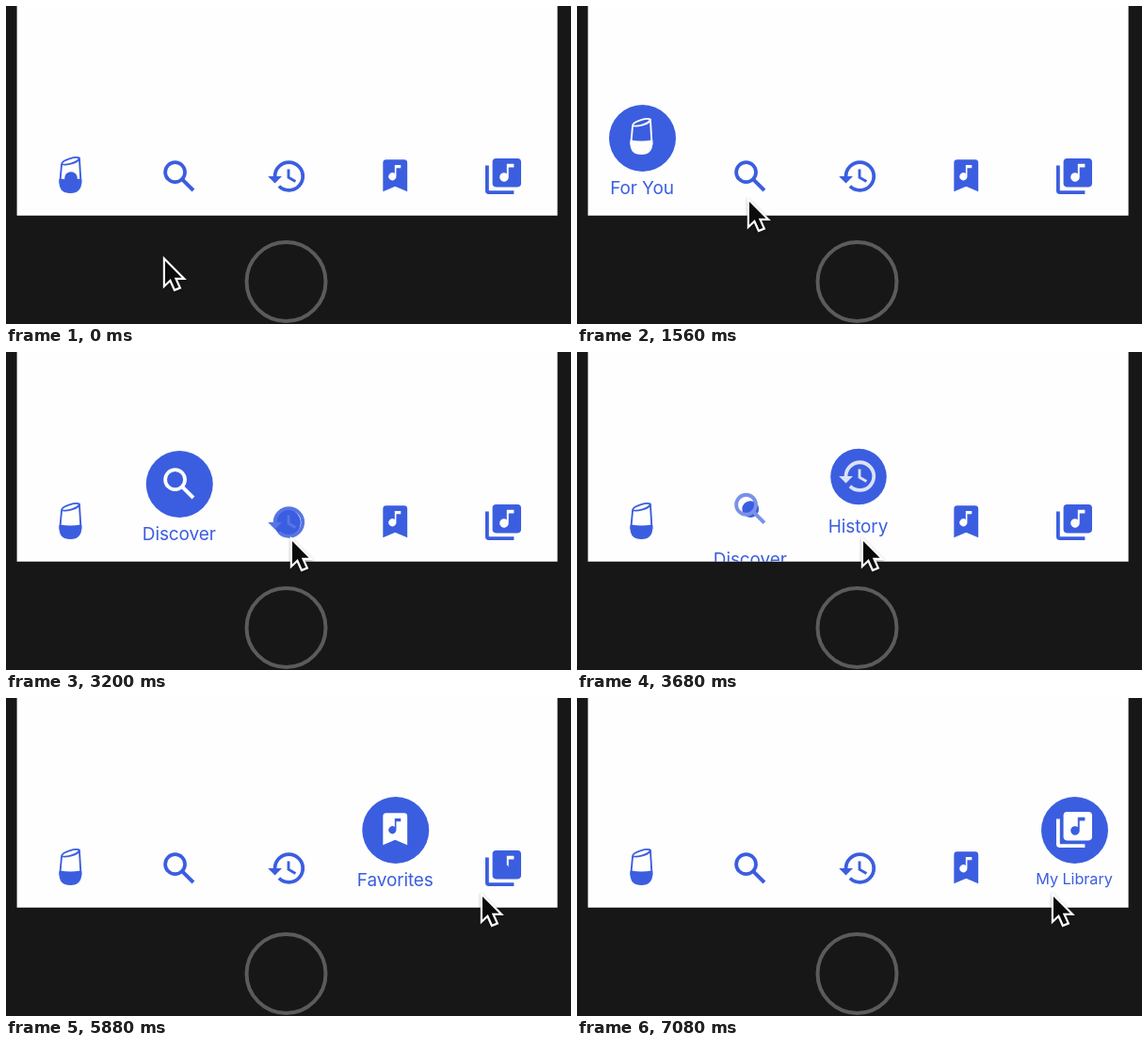
An HTML page with a canvas that plays this animation: 600x338 px, repeating every 7760 ms.

```html
<!DOCTYPE html>
<html lang="en">
<head>
<meta charset="utf-8">
<title>Tab bar</title>
<style>
  html, body { margin: 0; width: 100%; height: 100%; overflow: hidden; background: #171718; }
  canvas { display: block; width: 600px; height: 338px; }
</style>
</head>
<body>
<canvas id="stage" width="600" height="338"></canvas>
<script>
const ctx = document.getElementById('stage').getContext('2d');
const LOOP = 7760, STEP = 40, SPAN = 800;
const BLUE = [59, 94, 224], WHITE = [254, 254, 254];
const ACTIVE_Y = 140.5, ICON_Y = 139.5, TRAVEL = 41, RADIUS = 35.5;

const rgb = c => `rgb(${c.map(Math.round).join(',')})`;
const mix = (a, b, k) => a.map((v, i) => v + (b[i] - v) * k);
const clamp = v => Math.min(1, Math.max(0, v));

// Progress inside a window of the transition.
const part = (u, start, length) => clamp((u - start) / length);
const smooth = k => k * k * (3 - 2 * k);
const outQuad = k => 1 - (1 - k) ** 2;
const outSine = k => Math.sin(k * Math.PI / 2);
const outBack = (k, c = 2.9) => 1 + (c + 1) * (k - 1) ** 3 + c * (k - 1) ** 2;

// A drop swells under the icon, then the icon and its disc spring up.
const selecting = u => ({
  shift: TRAVEL * (1 - outBack(part(u, .385, .57))),
  radius: RADIUS * outSine(part(u, .18, .9)),
  white: outQuad(part(u, .06, 1.2)),
  dropR: 15 * outQuad(part(u, 0, .19)) * (1 - smooth(part(u, .6, .5))),
  dropY: 183 - 42 * part(u, .12, .78)
});
const leaving = u => ({
  shift: TRAVEL * smooth(part(u, .33, .7)),
  radius: RADIUS * (1 - smooth(part(u, .38, .55))),
  white: 1 - smooth(part(u, .3, .72)),
  dropR: 0,
  dropY: 0
});

function disc(x, y, r) {
  ctx.beginPath();
  ctx.arc(x, y, r, 0, Math.PI * 2);
  ctx.fill();
}

function line(width, d) {
  ctx.lineWidth = width;
  ctx.stroke(new Path2D(d));
}

// Adds a music note around the middle of its head.
function addNote(path, x, y, s) {
  path.moveTo(x + 5.5 * s, y - 7.5 * s);
  path.lineTo(x + 1.5 * s, y - 7.5 * s);
  path.arc(x, y, 2.5 * s, -.927, 0, true);
  path.lineTo(x + 2.5 * s, y - 5.5 * s);
  path.lineTo(x + 5.5 * s, y - 5.5 * s);
  path.closePath();
}

function drawCup() {
  const liquid = 'M-11 4Q0 6 11 4V6C11 15 7 17.5 0 17.5S-11 15-11 6Z';
  ctx.translate(-.6, 0);
  ctx.lineJoin = 'round';
  line(1.9, 'M-9.3-12.5L-11 6V8M11 8V6L9.5-19C6-21-9-17-9.3-12.5C-6-11 7-13 9.5-18.5');
  line(1.9, liquid);
  ctx.fill(new Path2D(liquid));
}

// The other icons use a 24-unit grid centred at 12,12.
const onGrid = paint => () => {
  ctx.translate(0, .5);
  ctx.scale(1.9, 1.9);
  ctx.translate(-12, -12);
  paint();
};

const drawSearch = onGrid(() => {
  ctx.lineWidth = 2;
  ctx.beginPath();
  ctx.arc(9.8, 9.7, 5.5, 0, Math.PI * 2);
  ctx.stroke();
  line(2.1, 'M13.7 13.6L20 19.9');
});

const drawHistory = onGrid(() => {
  ctx.lineWidth = 2;
  ctx.beginPath();
  ctx.arc(13, 12, 7.8, Math.PI, Math.PI * 2.75);
  ctx.stroke();
  ctx.fill(new Path2D('M1.3 12h7.8l-3.9 3.9z'));
  line(1.5, 'M12.8 8v4.6l3.9 2.3');
});

const drawRibbon = onGrid(() => {
  const path = new Path2D('M5.2 20.6V4.5q0-1.8 1.8-1.8h10q1.8 0 1.8 1.8v16.1L12 17.7z');
  addNote(path, 10.5, 12.1, .85);
  ctx.fill(path, 'evenodd');
});

const drawLibrary = onGrid(() => {
  const path = new Path2D();
  path.roundRect(6, 2, 16, 16, 2);
  addNote(path, 12.5, 12.5, 1);
  ctx.fill(path, 'evenodd');
  line(2, 'M3 6v14q0 1 1 1h14');
});

const tabs = [
  { label: 'For You', icon: drawCup, start: -40 },
  { label: 'Discover', icon: drawSearch, start: 1800 },
  { label: 'History', icon: drawHistory, start: 3080 },
  { label: 'Favorites', icon: drawRibbon, start: 4512 },
  { label: 'My Library', icon: drawLibrary, start: 5840, size: 16.3, base: 198 }
];

function drawTab({ label, icon, start, size = 19, base = 200.3 }, i, t) {
  const x = 69 + 114.75 * i;
  const next = tabs[i + 1];
  const pose = next && t >= next.start
    ? leaving((t - next.start) / SPAN)
    : selecting((t - start) / SPAN);

  ctx.fillStyle = rgb(BLUE);
  disc(x, pose.dropY, pose.dropR);
  disc(x + .5, ACTIVE_Y + pose.shift, pose.radius);
  ctx.font = `400 ${size}px Inter, "Liberation Sans", sans-serif`;
  ctx.letterSpacing = '-0.1px';
  ctx.textAlign = 'center';
  ctx.fillText(label, x, base + pose.shift);

  ctx.save();
  ctx.translate(x, ICON_Y + pose.shift);
  ctx.fillStyle = ctx.strokeStyle = rgb(mix(BLUE, WHITE, pose.white));
  icon();
  ctx.restore();
}

// Pointer rests; each later one is reached between begin and end.
const rests = [
  { x: 167, y: 267, begin: -1, end: 0 },
  { x: 181, y: 204, begin: 1360, end: 1560 },
  { x: 302, y: 197, begin: 2500, end: 2840 },
  { x: 400, y: 201.5, begin: 3760, end: 4240 },
  { x: 504, y: 207, begin: 5280, end: 5520 }
];
const arrow = new Path2D('M2 4V28.5L7.8 23 12.5 33.6 16.4 32 11.8 21.8H19.6Z');

function drawPointer(t) {
  let { x, y } = rests[0];
  for (const r of rests) {
    const k = smooth(part(t, r.begin, r.end - r.begin));
    x += (r.x - x) * k;
    y += (r.y - y) * k;
  }
  ctx.save();
  ctx.translate(x, y);
  ctx.lineJoin = 'miter';
  ctx.lineWidth = 4.4;
  ctx.strokeStyle = '#fff';
  ctx.shadowColor = 'rgba(0,0,0,.3)';
  ctx.shadowBlur = 3;
  ctx.shadowOffsetY = 1;
  ctx.stroke(arrow);
  ctx.shadowColor = 'transparent';
  ctx.fillStyle = '#0b0b0b';
  ctx.fill(arrow);
  ctx.restore();
}

function draw(t) {
  ctx.fillStyle = '#171718';
  ctx.fillRect(0, 0, 600, 338);
  ctx.strokeStyle = '#5b5b5c';
  ctx.lineWidth = 4;
  ctx.beginPath();
  ctx.arc(297.5, 293, 42, 0, Math.PI * 2);
  ctx.stroke();

  ctx.save();
  ctx.beginPath();
  ctx.rect(11.6, 0, 574, 222.7);
  ctx.clip();
  ctx.fillStyle = rgb(WHITE);
  ctx.fillRect(0, 0, 600, 338);
  tabs.forEach((tab, i) => drawTab(tab, i, t));
  ctx.restore();

  drawPointer(t);
}

const begin = performance.now();
function tick() {
  const t = (performance.now() - begin) % LOOP;
  draw(Math.floor(t / STEP) * STEP);
  requestAnimationFrame(tick);
}
tick();
</script>
</body>
</html>
```
